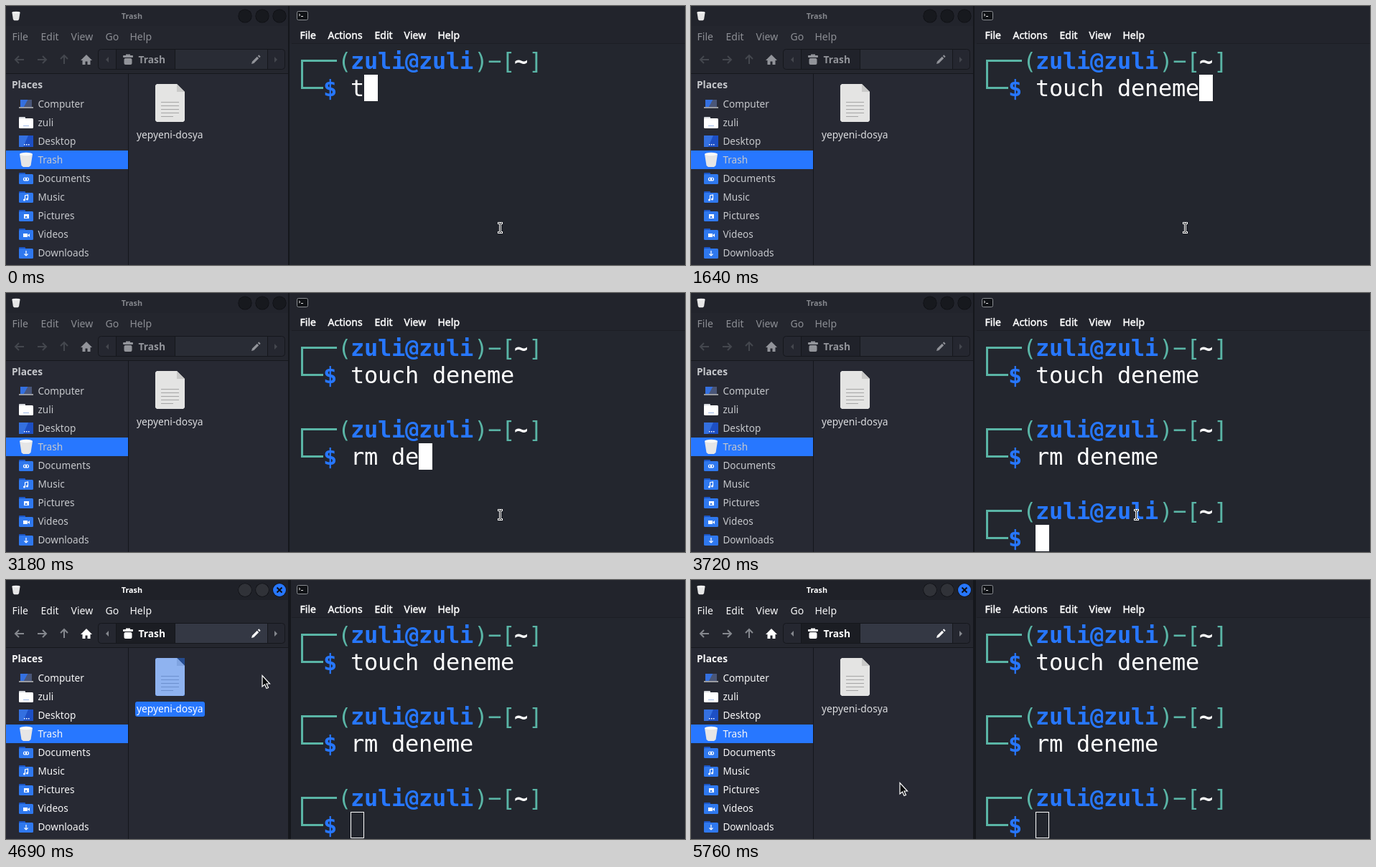
These frames come from a looping animation (946 by 362 pixels, 6.1 s). An HTML page with a canvas:

```html
<!DOCTYPE html>
<html lang="en">
<head>
<meta charset="utf-8">
<title>Trash and terminal</title>
<style>
html, body { margin: 0; width: 100%; height: 100%; overflow: hidden; background: #23252e; }
canvas { display: block; }
</style>
</head>
<body>
<canvas id="stage" width="946" height="362"></canvas>
<script>
const ctx = document.getElementById('stage').getContext('2d');
const LOOP = 6100, FOCUS = 4340;
const BLUE = '#2777ff', TEAL = '#5ab5a6', DARK = '#15171c';
const UI = '"Noto Sans", "Open Sans", sans-serif';
const MONO = '"DejaVu Sans Mono", monospace';
const USER = 'zuli';

// Terminal grid
const COL = 19, ROW = 38, LEFT = 404, TOP = 58;

const commands = [
  { text: 'touch deneme', enter: 1980,
    keys: [0, 120, 580, 690, 810, 920, 1130, 1250, 1300, 1370, 1520, 1640] },
  { text: 'rm deneme', enter: 3720,
    keys: [2370, 2500, 2980, 3040, 3180, 3280, 3380, 3520, 3720] },
  { text: '', enter: Infinity, keys: [] }
];

// Pointer stops: time, x, y
const stops = [[0, 688, 310]];
for (let i = 0; i <= 8; i++) {
  const k = i / 8;
  stops.push([Math.floor(3720 + i * 68.75), 620 - 372 * Math.sin(k * Math.PI / 2), 310 + 14 * k * k]);
}
stops.push(
  [4340, 248, 324], [4410, 271, 263], [4480, 320, 184], [4550, 350, 145], [4620, 357, 134],
  [4950, 357, 134], [5020, 303, 215], [5090, 278, 257], [5150, 266, 276], [5230, 262, 284],
  [5300, 266, 285], [5370, 279, 285], [5490, 291, 284]
);
const drags = [[4340, 4690], [4950, 5300]];
const clicks = [[5630, 5760]];
const selections = [[4550, 4950], [5230, 5630]];

const during = (spans, t) => spans.find(([a, b]) => t >= a && t < b);
const stopAt = t => stops.findLastIndex(s => s[0] <= t);

function box(x, y, w, h, color) {
  ctx.fillStyle = color;
  ctx.fillRect(x, y, w, h);
}

function round(x, y, w, h, r, fill, stroke) {
  ctx.beginPath();
  ctx.roundRect(x, y, w, h, r);
  if (fill) { ctx.fillStyle = fill; ctx.fill(); }
  if (stroke) { ctx.strokeStyle = stroke; ctx.lineWidth = 1; ctx.stroke(); }
}

function disc(x, y, r, fill) {
  ctx.beginPath();
  ctx.arc(x, y, r, 0, Math.PI * 2);
  ctx.fillStyle = fill;
  ctx.fill();
}

function shape(points, fill) {
  ctx.beginPath();
  points.forEach(([x, y]) => ctx.lineTo(x, y));
  ctx.closePath();
  ctx.fillStyle = fill;
  ctx.fill();
}

function line(points, color, width) {
  ctx.beginPath();
  points.forEach(([x, y], i) => i ? ctx.lineTo(x, y) : ctx.moveTo(x, y));
  ctx.strokeStyle = color;
  ctx.lineWidth = width;
  ctx.stroke();
}

function label(text, x, y, color, size = 14, weight = 400) {
  ctx.font = `${weight} ${size}px ${UI}`;
  ctx.fillStyle = color;
  ctx.fillText(text, x, y);
}

// Between regular and bold
function mediumLabel(text, x, y, color) {
  label(text, x, y, color);
  ctx.strokeStyle = color;
  ctx.lineWidth = .45;
  ctx.strokeText(text, x, y);
}

// Terminal

function put(text, col, row, color, bold) {
  ctx.font = `${bold ? 'bold ' : ''}32px ${MONO}`;
  ctx.fillStyle = color;
  [...text].forEach((c, i) => ctx.fillText(c, LEFT + (col + i) * COL, TOP + row * ROW + 30));
}

function prompt(row) {
  const x = 411, y = TOP + row * ROW + 17;
  box(x, y, 50, 3, TEAL);
  box(x, y, 3, ROW + 3, TEAL);
  box(x, y + ROW, 31, 3, TEAL);
  put('(', 3.06, row, TEAL);
  put(`${USER}@${USER}`, 4, row, BLUE, true);
  put(')\u2212[', 13.06, row, TEAL);
  put('~', 16, row, '#fff', true);
  put(']', 17.06, row, TEAL);
  put('$', 2, row + 1, BLUE, true);
}

function terminal(t, focused) {
  box(394, 0, 552, 362, '#23262e');
  box(394, 0, 552, 53, '#22242c');
  box(398, 52, 548, 1, '#1c1e25');
  box(393, 0, focused ? 4 : 2, 362, DARK);

  round(405.5, 7.5, 15, 12, 2, '#101216', '#8b8e93');
  line([[408, 11], [410, 12.5], [408, 14]], '#e4e4e4', 1);
  box(411, 14, 3, 1, '#e4e4e4');

  [['File', 409], ['Actions', 448], ['Edit', 513], ['View', 554], ['Help', 601]]
    .forEach(([s, x]) => mediumLabel(s, x + .5, 46, '#fff'));

  let row = 0;
  for (const cmd of commands) {
    const typed = cmd.keys.filter(k => t >= k).length;
    prompt(row);
    put(cmd.text.slice(0, typed), 4, row + 1, '#fff');
    if (t < cmd.enter) {
      const x = LEFT + (4 + typed) * COL, y = TOP + (row + 1) * ROW;
      if (focused) {
        ctx.strokeStyle = '#fff';
        ctx.lineWidth = 1;
        ctx.strokeRect(x + .5, y + .5, COL - 1, ROW - 2);
      } else {
        box(x, y, COL, ROW - 1, '#fff');
      }
      break;
    }
    row += 3;
  }
}

// File manager

function bin(x, y, s) {
  ctx.save();
  ctx.translate(x, y);
  ctx.scale(s, s);
  shape([[-9, -8], [9, -8], [6.5, 8], [4, 10], [-4, 10], [-6.5, 8]], '#e6e6e6');
  ctx.beginPath();
  ctx.ellipse(0, -8, 9, 2.2, 0, 0, Math.PI * 2);
  ctx.fillStyle = '#fafafa';
  ctx.fill();
  ctx.restore();
}

function screen(x, y, w, h, right) {
  box(x, y, w, h, right);
  shape([[x, y], [x + w * .65, y], [x + w * .3, y + h], [x, y + h]], '#3470e0');
}

function folder(y, front) {
  round(18, y - 8, 9, 6, 1, front === '#fff' ? '#d5d8dd' : '#1c55c4');
  round(18, y - 6, 20, 14, 1.5, front);
}

const marks = {
  Documents(y) {
    ctx.strokeStyle = '#fff';
    ctx.lineWidth = 1.2;
    for (const x of [24.5, 27.5]) {
      ctx.beginPath();
      ctx.roundRect(x, y - 1, 4, 4, 2);
      ctx.stroke();
    }
  },
  Music(y) {
    line([[26.5, y + 4], [26.5, y - 2], [30.5, y - 3], [30.5, y + 3]], '#fff', 1.2);
    disc(25.5, y + 4, 1.5, '#fff');
    disc(29.5, y + 3, 1.5, '#fff');
  },
  Pictures(y) {
    box(25, y - 2, 7, 6, '#fff');
    shape([[26, y + 3], [28, y], [30, y + 3]], '#2f78ee');
  },
  Videos(y) {
    box(24, y - 1, 6, 5, '#fff');
    shape([[30, y + 1.5], [33, y - 1], [33, y + 4]], '#fff');
  },
  Downloads(y) {
    line([[28, y - 3], [28, y + 4]], '#fff', 1.2);
    line([[25.5, y + 1.5], [28, y + 4], [30.5, y + 1.5]], '#fff', 1.2);
  }
};

function placeIcon(name, y) {
  if (name === 'Computer') {
    screen(20, y - 6, 16, 10, '#4a5678');
    box(18, y + 4, 20, 2, '#9a9ca1');
  } else if (name === USER) {
    folder(y, '#fff');
    box(24, y + 4, 8, 1, '#9db8e8');
  } else if (name === 'Desktop') {
    screen(18, y - 8, 20, 16, '#1d4fc4');
    for (let i = 0; i < 3; i++) box(25 + i * 3, y + 4, 1.5, 1.5, '#fff');
  } else if (name === 'Trash') {
    bin(28, y, 1);
  } else {
    folder(y, '#2f78ee');
    marks[name](y);
  }
}

function arrow(x, y, angle, color) {
  ctx.save();
  ctx.translate(x, y);
  ctx.rotate(angle);
  line([[6, 0], [-5, 0]], color, 2);
  line([[-1, -5], [-6, 0], [-1, 5]], color, 2);
  ctx.restore();
}

function toolbar(focused, strong) {
  const faint = focused ? '#85888e' : '#44474e';
  arrow(19, 75, 0, faint);
  arrow(50, 75, Math.PI, faint);
  arrow(81, 75, Math.PI / 2, faint);
  shape([[112, 68], [120, 76], [117.5, 76], [117.5, 82], [113.5, 82], [113.5, 77.5],
    [110.5, 77.5], [110.5, 82], [106.5, 82], [106.5, 76], [104, 76]], strong);

  round(128.5, 60.5, 260, 28, 4, '#252730', DARK);
  box(154, 61, 81, 27, focused ? '#1b1d23' : '#20222a');
  box(236, 61, 128, 27, focused ? '#343844' : '#292c35');
  for (const x of [153, 235, 364]) box(x, 61, 1, 27, DARK);
  shape([[143, 71], [143, 79], [139, 75]], faint);
  shape([[374, 71], [374, 79], [378, 75]], faint);

  round(163, 69, 14, 3, 1, strong);
  box(167, 67.5, 6, 2, strong);
  round(164.5, 73, 11, 9, 2, strong);
  label('Trash', 184.5, 80, strong, 13.8, 700);

  line([[344, 79], [351, 72]], strong, 3.2);
  shape([[342, 81], [343, 77.5], [345.5, 80]], strong);
  line([[352, 71], [353.5, 69.5]], strong, 3.2);
}

function titlebar(focused) {
  box(0, 0, 393, 28, focused ? '#1f2128' : '#22242c');
  bin(14, 14, .62);
  label('Trash', 160.7, 18, focused ? '#fff' : '#84868c', 10.8, 700);
  for (const x of [333, 357, 381]) {
    disc(x, 14, 9.6, '#0d0e12');
    disc(x, 14, 9, !focused ? '#17191e' : x === 381 ? BLUE : '#303238');
  }
  if (focused) {
    line([[377.5, 10.5], [384.5, 17.5]], '#0d0e12', 2);
    line([[384.5, 10.5], [377.5, 17.5]], '#0d0e12', 2);
  }
}

function file(selected) {
  shape([[210, 109], [238, 109], [249, 120], [249, 160], [247, 162], [210, 162], [208, 160], [208, 111]], '#e4e4e3');
  shape([[238, 109], [249, 120], [238, 120]], '#c9c9c8');
  for (let i = 0; i < 5; i++) box(216, 134 + i * 5, i === 4 ? 17 : 25, 1, '#a5a5a5');
  if (selected) {
    box(208, 109, 41, 53, 'rgba(39,119,255,.45)');
    round(180, 170, 97, 21, 3, BLUE);
  }
  label('yepyeni-dosya', 182, 185, selected ? '#fff' : '#dcdde0', 13.8);
}

function manager(t, focused) {
  const strong = focused ? '#fff' : '#92949a';
  const text = focused ? '#f6f6f7' : '#c6c8cc';
  box(0, 0, 393, 362, '#272933');
  box(0, 28, 393, 66, '#24262e');
  titlebar(focused);
  [['File', 8], ['Edit', 48], ['View', 90], ['Go', 138], ['Help', 172]]
    .forEach(([s, x]) => label(s, x + .5, 48, focused ? text : '#8c8e94'));
  toolbar(focused, strong);
  box(0, 94, 393, 1, DARK);
  box(170, 95, 1, 267, DARK);

  label('Places', 8, 115, text, 13.7, 700);
  ['Computer', USER, 'Desktop', 'Trash', 'Documents', 'Music', 'Pictures', 'Videos', 'Downloads']
    .forEach((name, i) => {
      const y = 137 + i * 26;
      if (name === 'Trash') box(0, y - 13, 170, 26, BLUE);
      placeIcon(name, y);
      label(name, 44.4, y + 5, text, 13.6);
    });
  file(during(selections, t));
}

// Pointer

function rubberBand(t, drag) {
  const [, ax, ay] = stops[stopAt(drag[0])];
  const [, bx, by] = stops[Math.max(stopAt(t) - 1, stopAt(drag[0]))];
  const x = Math.min(ax, bx), y = Math.min(ay, by);
  const w = Math.abs(ax - bx), h = Math.abs(ay - by);
  if (!w || !h) return;
  box(x, y, w, h, 'rgba(28,84,190,.28)');
  ctx.strokeStyle = '#1b5ad2';
  ctx.lineWidth = 1;
  ctx.strokeRect(x + .5, y + .5, w - 1, h - 1);
}

function beam(x, y) {
  const parts = [[-2, -7, 2, 1], [1, -7, 2, 1], [0, -6, 1, 12], [-2, 6, 2, 1], [1, 6, 2, 1]];
  for (const [dx, dy, w, h] of parts) box(x + dx - 1, y + dy - 1, w + 2, h + 2, '#fff');
  for (const [dx, dy, w, h] of parts) box(x + dx, y + dy, w, h, '#0c0d10');
}

function pointer(x, y) {
  ctx.beginPath();
  [[0, -.5], [0, 15], [3.5, 12], [6, 17.5], [8.5, 16.5], [6, 11], [10.5, 11]]
    .forEach(([dx, dy]) => ctx.lineTo(x + dx, y + dy));
  ctx.closePath();
  ctx.fillStyle = '#08090b';
  ctx.fill();
  ctx.strokeStyle = '#fff';
  ctx.lineWidth = 1.2;
  ctx.stroke();
}

function mouse(t) {
  const drag = during(drags, t);
  const [x, y] = stops[stopAt(t)].slice(1).map(Math.round);
  if (drag) rubberBand(t, drag);
  if (drag || during(clicks, t)) disc(x, y, 12, '#918f1c');
  (x > 395 ? beam : pointer)(x, y);
}

function draw() {
  const t = performance.now() % LOOP;
  const focused = t >= FOCUS;
  manager(t, focused);
  terminal(t, focused);
  mouse(t);
  requestAnimationFrame(draw);
}
draw();
</script>
</body>
</html>
```
